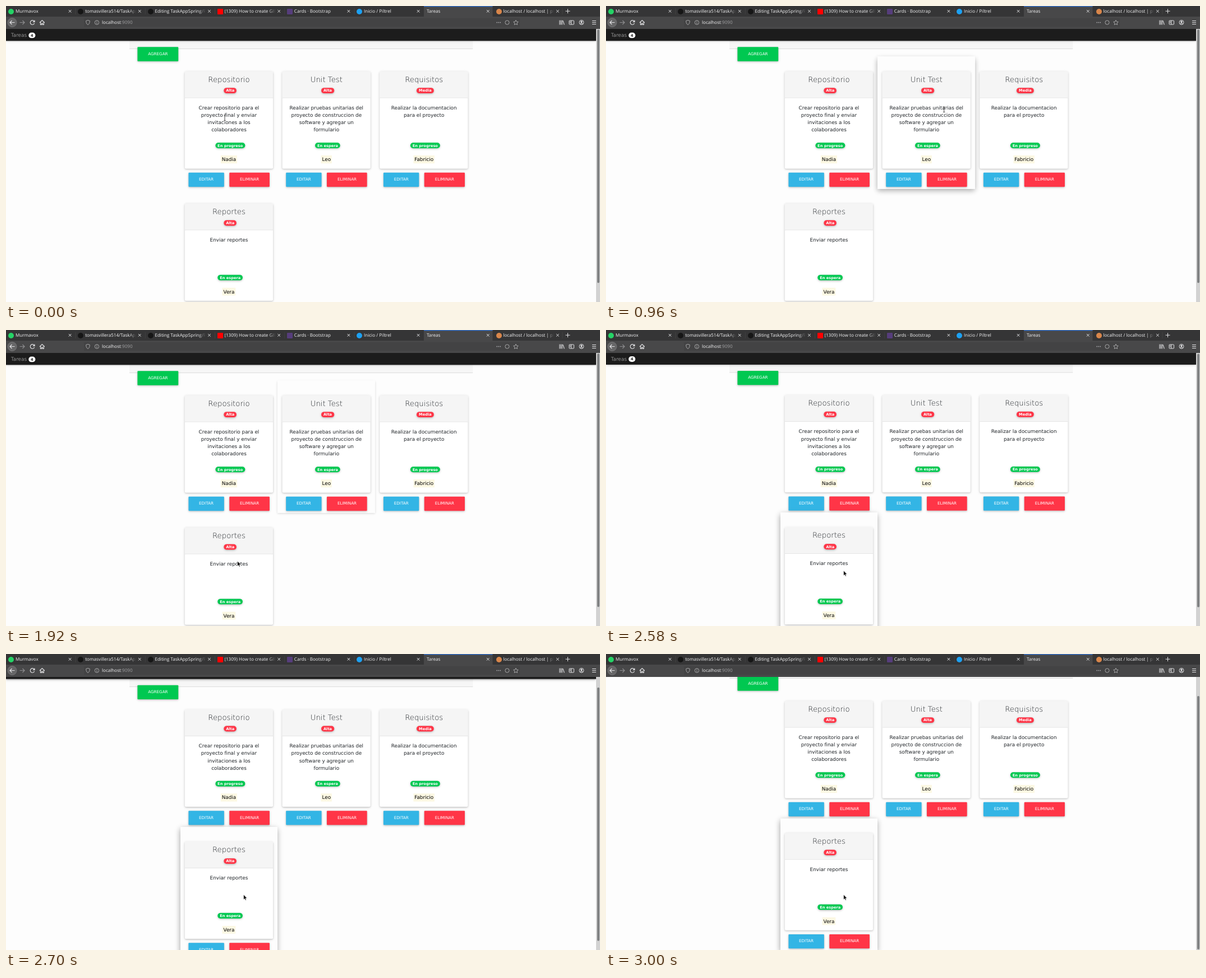
Write an HTML page that moves like this. It is 1059 px wide and 529 px high and loops after 3.03 s.

```html
<!DOCTYPE html>
<html lang="es">
<head>
<meta charset="utf-8">
<title>Tareas</title>
<style>
html, body { margin: 0; width: 100%; height: 100%; overflow: hidden; background: #fdfdfd; }
body { position: relative; color: #212529; text-rendering: geometricPrecision; }
div, p, svg, i { position: absolute; margin: 0; }
svg { left: 0; top: 0; overflow: visible; }

#chrome { left: 0; top: 0; width: 1059px; height: 41px; background: #484849; font: 8.1px/12px "Open Sans", "Noto Sans", sans-serif; color: #f4f4f5; }
.tab { top: 3.5px; width: 91px; overflow: hidden; white-space: pre; -webkit-mask: linear-gradient(90deg, #000 78px, transparent 91px); mask: linear-gradient(90deg, #000 78px, transparent 91px); }
.icon { top: 4.5px; width: 10px; height: 10px; }

#view { left: 0; top: 41px; width: 1059px; height: 488px; overflow: hidden; }
/* The page is laid out 1920 px wide and scaled to the stage. */
#page { left: 0; top: -41px; width: 1908px; height: 1021px; transform-origin: 0 0; font: 16px/24px "DejaVu Sans", sans-serif; }
#nav { left: 0; top: 74px; width: 1908px; height: 39px; background: #1c1c1c; box-shadow: 0 2px 5px #0004, 0 2px 10px #0002; }
#bar { left: 399px; top: 100px; width: 1110px; height: 38px; background: #f6f6f6; border-bottom: 1px solid #c8c8c8; }
.col { width: 315.3px; height: 428px; }
.card, .btn, .badge { box-shadow: 0 2px 5px #00000029, 0 2px 10px #0000001f; }
.card { left: 15px; top: 48px; width: 285.3px; height: 314.5px; background: #fff; border-radius: 4px; }
.head { width: 100%; height: 85px; background: #f5f5f5; border-bottom: 1px solid #d8d8d8; }
.col p { left: 0; width: 316px; text-align: center; white-space: pre-line; }
.col .title { top: 60px; font-size: 24px; font-weight: 200; line-height: 28.8px; }
.badge { display: inline-block; padding: 0 7.2px; border-radius: 9px; font: bold 12px/18px "DejaVu Sans", sans-serif; color: #fff; }
.btn { padding: 0 34.2px; border-radius: 2px; font-size: 13px; line-height: 46.3px; color: #fff; }
.red { background: #ff3547; }
.green { background: #00c851; }
.blue { background: #33b5e5; }
mark { background: #fcf8e3; color: #000; padding: 3.2px; }
#track { left: 1052px; top: 0; width: 7px; height: 488px; background: #d2d2d2; }
#thumb { left: 2px; top: 1px; width: 4px; height: 453px; border-radius: 2px; background: #7e8081; }
</style>
</head>
<body>
<div id="view">
  <div id="page">
    <div id="bar"></div>
    <div id="nav">
      <p style="left:16px;top:9px;color:#fff;font-weight:200">Tareas</p>
      <p class="badge" style="left:72.5px;top:12px;background:#fff;color:#1c1c1c">4</p>
    </div>
    <div class="btn green" style="left:425px;top:132.500px">AGREGAR</div>
  </div>
  <div id="track"><div id="thumb"></div></div>
</div>
<div id="chrome"></div>
<svg width="1" height="1">
  <g id="cursor">
    <path id="arrow" d="M0 0V9L2 7.2L3.4 10.2L4.9 9.5L3.6 6.7L6.3 6.4Z" fill="#111" stroke="#fff" stroke-width=".6"/>
    <path id="beam" d="M-1.8 -5Q0 -5 0 -4Q0 -5 1.8 -5M0 -4V4M-1.8 5Q0 5 0 4Q0 5 1.8 5" fill="none" stroke="#333" stroke-width=".9"/>
  </g>
</svg>
<script>
const $ = id => document.getElementById(id);
const SCALE = 1059 / 1920;

// Browser tabs: title, icon colour, icon radius
const tabs = [
  ['Murmavox', '#25d366', 5], ['tomasvillera514/TaskApp', '#161616', 5],
  ['Editing TaskAppSpring/README', '#161616', 5], ['(1309) How to create GIF', '#f00', 1],
  ['Cards · Bootstrap', '#563d7c', 1], ['Inicio / Piltrel', '#1da1f2', 5],
  ['Tareas'], ['localhost / localhost | phpMyAdmin', '#d9864a', 5]
];
let crosses = '', labels = '';
tabs.forEach(([name, color, radius], i) => {
  const x = 124.2 * i;
  if (color) labels += `<i class="icon" style="left:${x + 4.2}px;background:${color};border-radius:${radius}px"></i>`;
  labels += `<p class="tab" style="left:${x + (color ? 17 : 4.8)}px">${name}</p>`;
  crosses += `M${x + 111.8} 7l4.6 4.6m0 -4.6l-4.6 4.6`;
});
$('chrome').innerHTML = `<svg width="1059" height="41" fill="none" stroke="#e2e2e4">
  <path d="M0 0H745V19H0ZM867.5 0H1059V19H867.5Z" fill="#353536" stroke="none"/>
  <path d="M124 4V15M248.3 4V15M372.5 4V15M496.7 4V15M621 4V15M992 4V15" stroke="#4a4a4b" stroke-width=".6"/>
  <path d="M745 .6H867.5" stroke="#2f6fd0" stroke-width="1.2"/>
  <path d="${crosses}M1001.5 5.2v8m-4 -4h8"/>
  <rect x="139" y="21.8" width="777" height="15.5" rx="1.5" fill="#434344" stroke="none"/>
  <circle cx="11" cy="29.5" r="8" fill="#666667" stroke="#858586" stroke-width=".6"/>
  <path d="M15.5 29.5H7m3.5 -3.5L7 29.5l3.5 3.5" stroke-width="1.2"/>
  <path d="M24.500 29.5H33m-3.5 -3.5l3.5 3.5l-3.5 3.5" stroke="#8d8d8f" stroke-width="1.2"/>
  <path d="M50.4 27.6A3.8 3.8 0 1 0 50.7 30.6M51 25.4V28.4H48" stroke-width="1.2"/>
  <path d="M60 29.8L64.4 25.5L68.8 29.8M61.5 29V33.5H63.5V31H65.3V33.5H67.3V29" stroke-width="1.2"/>
  <g stroke="#b1b1b3" stroke-width=".9">
    <path d="M146 25.4L149.3 26.5C149.3 30 148.5 32 146 33.6C143.5 32 142.7 30 142.7 26.5Z"/>
    <circle cx="162" cy="29.5" r="3.7"/><path d="M162 29V31.7M162 27V28"/>
    <path d="M874.5 29.5h1.6m1.4 0h1.6m1.4 0h1.6" stroke-width="1.6"/>
    <circle cx="893.5" cy="29.5" r="3.6"/>
    <path d="M909 25.2l1.3 2.8l3 .4l-2.2 2.1l.5 3l-2.6 -1.4l-2.6 1.4l.5 -3l-2.2 -2.1l3 -.4Z"/>
  </g>
  <path d="M987 25.5v8m2.2 -8v8m2.2 -8v8m1.4 -7.5l2.5 7.5" stroke-width="1.1"/>
  <rect x="1004" y="26" width="8.5" height="7" rx="1"/><path d="M1008 26v7m-3 -5h2m-2 2h2"/>
  <circle cx="1026" cy="29.3" r="4"/><circle cx="1026" cy="28.3" r="1.3" fill="#e2e2e4"/><path d="M1023.5 32q2.5 -2.5 5 0"/>
  <path d="M1045 26.5h7m-7 3h7m-7 3h7" stroke-width="1.1"/>
</svg>${labels}
<p style="left:171px;top:23.5px">localhost<span style="color:#a2a2a4">:9090</span></p>`;

// Task cards
const tasks = [
  ['Repositorio', 'Alta', 'Crear repositorio para el\nproyecto final y enviar\ninvitaciones a los\ncolaboradores', 'En progreso', 'Nadia'],
  ['Unit Test', 'Alta', 'Realizar pruebas unitarias del\nproyecto de construccion de\nsoftware y agregar un\nformulario', 'En espera', 'Leo'],
  ['Requisitos', 'Media', 'Realizar la documentacion\npara el proyecto', 'En progreso', 'Fabricio'],
  ['Reportes', 'Alta', 'Enviar reportes', 'En espera', 'Vera']
];
const badge = (y, color, text) => `<p style="top:${y}px;left:4px;line-height:18px"><span class="badge ${color}">${text}</span></p>`;
const button = (x, color, text) => `<div class="btn ${color}" style="left:${x}px;top:375.5px">${text}</div>`;
const cols = tasks.map(([title, level, text, state, who], i) => {
  const col = document.createElement('div');
  col.className = 'col';
  col.style.left = 562.6 + 315.2 * (i % 3) + 'px';
  col.style.top = (i < 3 ? 164 : 592.4) + 'px';
  col.innerHTML = `<div class="card"><div class="head"></div></div>
    <p class="title">${title}</p>${badge(100.4, 'red', level)}
    <p style="top:154px">${text}</p>${badge(277.5, 'green', state)}
    <p style="top:321.6px"><mark>${who}</mark></p>
    ${button(27, 'blue', 'EDITAR')}${button(159.3, 'red', 'ELIMINAR')}`;
  $('page').append(col);
  return col;
});

// Hover strength of each column over time
const hover = [
  [[0, .04], [500, 1], [540, 1], [1090, 0]],
  [[500, 0], [1050, 1], [1065, 1], [1460, .2], [1760, .6], [1920, .4], [2150, 0]],
  [[1065, 0], [1480, .8], [1900, 0]],
  [[1885, 0], [2435, 1]]
];
const path = [[0, 390, 200], [380, 394, 198], [560, 530, 185], [830, 538, 184], [1230, 737, 187], [1340, 737, 187],
  [1480, 640, 200], [1760, 540, 310], [1920, 412.5, 413], [2250, 423.5, 430]];

const linear = u => u;
const smooth = u => u * u * (3 - 2 * u);

function at(keys, t, col = 1, ease = linear) {
  const n = keys.findIndex(k => k[0] > t);
  if (n < 0) return keys[keys.length - 1][col];
  if (n === 0) return keys[0][col];
  const a = keys[n - 1], b = keys[n];
  return a[col] + (b[col] - a[col]) * ease((t - a[0]) / (b[0] - a[0]));
}

// cubic-bezier(.25, .1, .25, 1)
function easeScroll(x) {
  let lo = 0, hi = 1, s;
  for (let i = 0; i < 20; i++) {
    s = (lo + hi) / 2;
    if (.75 * s * (1 - s) + s ** 3 < x) lo = s; else hi = s;
  }
  return .3 * s * (1 - s) ** 2 + 3 * s * s * (1 - s) + s ** 3;
}

function draw() {
  const t = Math.floor((performance.now() + 1) % 3030 / 30) * 30;
  const scroll = 33 * easeScroll(Math.min(1, Math.max(0, (t - 2570) / 418)));
  $('page').style.transform = `translateY(${-scroll}px) scale(${SCALE})`;
  $('thumb').style.transform = `translateY(${scroll}px)`;
  cols.forEach((col, i) => {
    const p = at(hover[i], t, 1, smooth);
    col.style.boxShadow = p ? `0 ${8 * p}px ${17 * p}px rgba(0,0,0,${.2 * p}), 0 ${6 * p}px ${20 * p}px rgba(0,0,0,${.19 * p})` : 'none';
  });
  $('cursor').setAttribute('transform', `translate(${at(path, t)} ${at(path, t, 2)})`);
  const onText = t < 450 || t > 530 && t < 1000;
  $('beam').style.display = onText ? '' : 'none';
  $('arrow').style.display = onText ? 'none' : '';
  requestAnimationFrame(draw);
}
draw();
</script>
</body>
</html>
```
